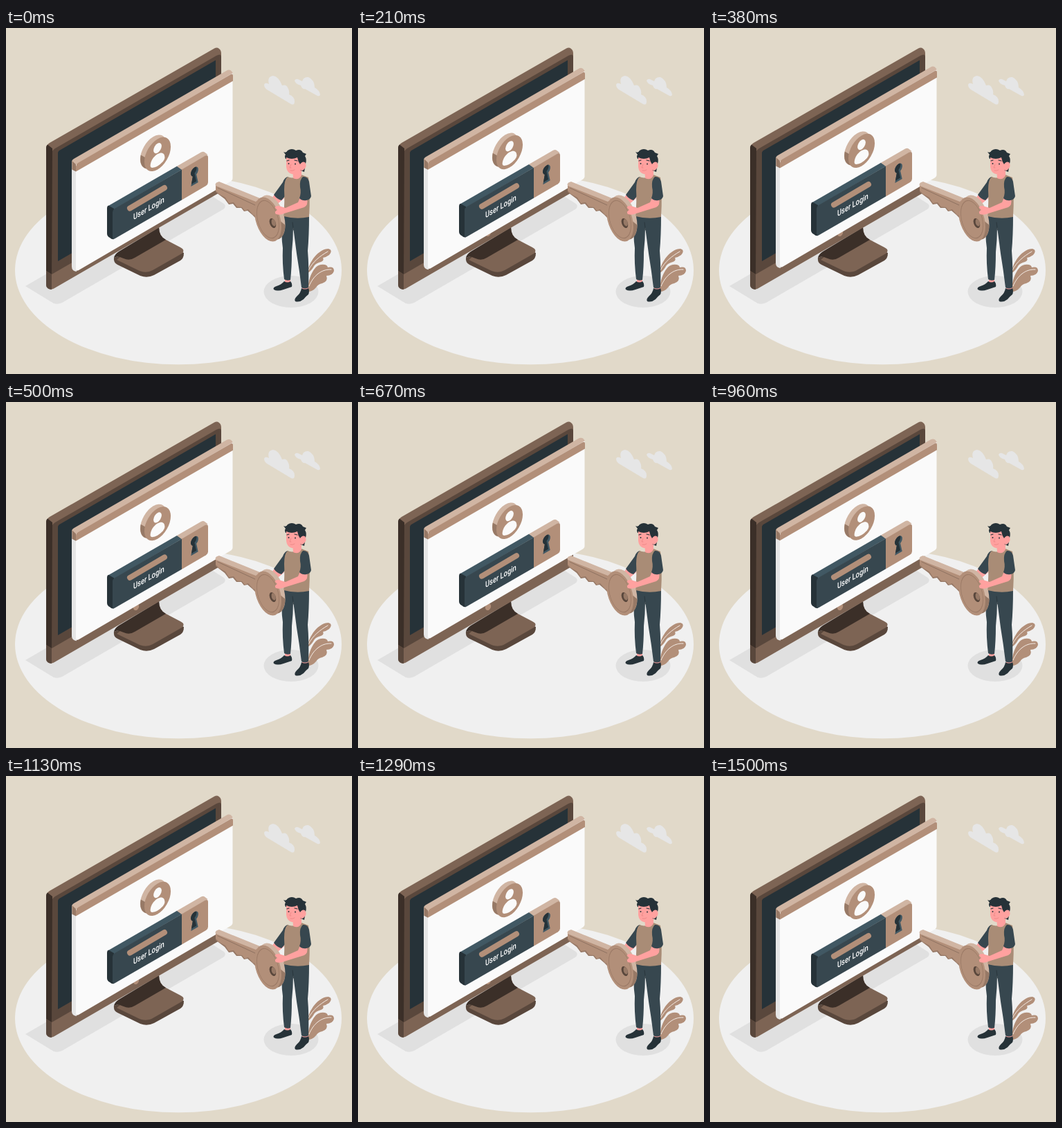
Recreate the animation shown at these times as an HTML page. Size 500 by 500 pixels, loop 1540 ms.

```html
<!DOCTYPE html>
<html lang="en">
<head>
<meta charset="utf-8">
<title>User Login</title>
<style>
  html, body { margin: 0; height: 100%; overflow: hidden; background: #e1d9c9; }
  svg { display: block; width: 100%; height: 100%; }
  .tan { fill: #b28f79; }
  .shirt { fill: #a98c76; }
  .light { fill: #d0b5a3; }
  .shade { fill: #977966; }
  .brown { fill: #7d6454; }
  .deep { fill: #59473c; }
  .dark { fill: #3b2f28; }
  .ink { fill: #263238; }
  .slate { fill: #37474f; }
  .steel { fill: #415863; }
  .grey { fill: #e0e0e0; }
  .white { fill: #fafafa; }
  .skin { fill: #ffa19f; }
  .line { fill: none; stroke-linecap: round; stroke-linejoin: round; }
</style>
</head>
<body>
<svg viewBox="0 0 500 500">
  <defs>
    <path id="keyhole" d="M-3 5A6.3 6.3 0 1 1 3 5L6 18H-6Z"/>
    <clipPath id="hole"><use href="#keyhole"/></clipPath>
  </defs>

  <g fill="#e6e6e6">
    <path d="M373 82Q374 78 380 81Q377 70 386 69Q394 70 399 83Q405 81 407 86Q410 91 409 96Q417 99 417 106Q417 112 412 110L377 89Q373 86 373 82Z"/>
    <path d="M417 76Q419 72 424 75L428 77Q430 70 437 71Q446 75 446 86Q453 90 454 96Q454 99 450 98L432 88Q428 89 426 83Q418 81 417 76Z"/>
  </g>

  <ellipse cx="249" cy="350" rx="236" ry="136.300" fill="#f0f0f0"/>
  <g class="grey">
    <path d="M28 373L66 351L296 242L315 254Q319 258 314 262L81 397Q75 400 69 398Z"/>
    <ellipse cx="412" cy="381" rx="39.500" ry="23"/>
  </g>

  <g id="monitor">
    <path class="deep" d="M156 332Q155 339 161 342L194 358Q204 362 214 357L252 336Q257 333 257 325L220 310Z"/>
    <path class="brown" d="M221 288Q221 301 231 306L252 317Q260 321 254 326L212 350Q203 355 193 351L160 335L190 310Z"/>
    <path class="dark" d="M156 332Q157 327 163 323L221 288Q221 301 231 306L186 332Q178 337 170 333L162 330Z"/>
    <path class="brown" d="M58 174Q58 169 63 166L301 29.500Q305 27.500 308 30Q311 32 311 37V236.500L70 376Q66 378.500 62 377Q58 375 58 371Z"/>
    <path class="deep" d="M66 182Q66 177 71 174L304 40Q311 36 311 42V215L66 356Z"/>
    <path class="dark" d="M58 173Q58 170 60 168.500L67 174L66 356L58 351Z"/>
    <path class="deep" d="M58 351L66 356V378Q58 377 58 371Z"/>
    <path class="ink" d="M75 181Q75 178 78 176.500L303 46.500V205L75 337Z"/>
    <ellipse cx="188" cy="296" rx="4" ry="5.200" transform="rotate(20 188 296)" class="tan"/>
  </g>

  <g id="panel">
    <path d="M95 192L102 196V352Q95 351 95 345Z" fill="#e6e6e6"/>
    <path class="white" d="M101 195L327.500 64V217Q327.500 220 324 222L105 350Q101 352 101 348Z"/>
    <path class="light" d="M95 194Q95 190.500 98 189L319 61.500Q322 59.700 325 61.500L328 65L102 197.500Z"/>
    <path class="tan" d="M101 200Q101 197 104 195L324 67.500Q328 65 328 69V76.500L101 207.500Z"/>
    <path class="shade" d="M95.300 192L101 197V207.500L95.300 204.500Z"/>

    <g transform="matrix(.866 -.5 0 1 213 179)">
      <circle r="22" class="light"/>
      <path class="shade" d="M-21 -6A22 22 0 0 0 12 18.400L19 25.300L-14 1Z"/>
    </g>
    <g transform="matrix(.866 -.5 0 1 219 182.400)">
      <circle r="22" class="tan"/>
      <g class="white">
        <circle cy="-8.800" r="6.800"/>
        <path d="M-12 11C-12 -4 12 -4 12 11Q12 13 9 15Q0 19 -9 15Q-12 13 -12 11Z"/>
      </g>
    </g>

    <path class="steel" d="M147 257.500L247 199.700L255 204L155 263Z"/>
    <path class="light" d="M247 199.700L282 179.500Q285 178 287 179.500L291.500 183L254 205Z"/>
    <path class="ink" d="M146 260Q146 257 148 256.500L156 261V305Q153 306 150 303Q146 301 146 297Z"/>
    <path class="slate" d="M154 266Q154 263 157 261L254 204.500V248.500L157 304.500Q154 306 154 302Z"/>
    <path class="tan" d="M254 204.500L288 184.500Q292 182.500 292 187V223Q292 226 289 228L254 248.500Z"/>
    <path class="line" d="M179 260.500L229 231" stroke="#b28f79" stroke-width="8"/>
    <text transform="matrix(.76 -.44 0 1 184 277.500)" font-family="Roboto, sans-serif" font-weight="500" font-size="12.300" fill="#fff">User Login</text>
    <g transform="matrix(.866 -.5 0 1 272.500 208)">
      <use href="#keyhole" class="steel"/>
      <g clip-path="url(#hole)"><use href="#keyhole" x="-3" y="-3" class="ink"/></g>
    </g>
  </g>

  <g id="plant" class="tan">
    <path d="M436 354C437 338 452 319 466 319Q473 321 467 328Q463 331 458 332Q461 337 452 339Q446 341 444 346Q440 352 436 354Z"/>
    <path d="M436 381C436 362 445 343 455 342Q464 341 465 346Q474 344 474 351Q472 358 463 358Q466 366 457 369Q451 370 448 375Q443 381 436 381Z"/>
    <path class="line" stroke="#f5ece6" stroke-width="1" d="M437 350C443 338 453 330 465 323M438 373C444 358 456 348 470 349"/>
  </g>

  <g id="legs">
    <path class="skin" d="M403 360H411V370H403ZM428 371H437V381H428Z"/>
    <path class="ink" d="M402 366Q407 369 411 366Q414 369 413 374Q407 376 401 378Q392 381 387 378Q385 375 391 373Q398 371 402 366Z"/>
    <path class="ink" d="M427 376Q432 379 437 376Q439 380 437 385Q433 388 430 392Q424 397 418 395Q416 392 420 388Q426 383 427 376Z"/>
    <path class="slate" d="M400 270H438Q438 300 436 322Q438 345 437 375Q432 378 427 375Q424 350 420 326L415 288Q415 305 413 324Q413 346 411 364Q406 366 402 363Q399 340 400 318Q397 300 400 270Z"/>
    <path class="line" stroke="#263238" stroke-width=".8" d="M415.500 292L414 281"/>
  </g>

  <g id="body">
    <path class="skin" d="M390 238L402 246L388 258L355 250Q351 246 358 247L381 250Z"/>
    <path class="slate" d="M408 215Q403 215 400 223L387 241Q391 247 398 249L408 238Z"/>
    <path class="shirt" d="M407 215Q415 219 427 212L437 216Q440 240 438 273Q420 277 401 272Q403 250 402 234Q402 219 407 215Z"/>
    <path class="skin" d="M414 200H427V213Q423 221 415 217Z"/>
  </g>

  <g id="key">
    <path class="shade" d="M303 228L361 254V275L356 270L349 264L344 265L340 260L333 260L328 254L322 255L316 247L308 241L303 237Z"/>
    <path class="tan" d="M303 226L364 250V273L357 270L350 262L345 264L341 259L334 258.500L329 252L322 253L317 245L308 240L303 235Z"/>
    <path class="light" d="M302.500 226Q303 223 308 222L367 246L361 251L303 228Z"/>
    <path class="line" stroke="#8e7261" stroke-width="1" d="M306 231L360 256"/>
    <g transform="matrix(.866 .5 0 1 384 273.500)">
      <ellipse rx="22.500" ry="30" class="light"/>
      <path class="shade" d="M22.500 0A22.500 30 0 0 1 0 30L-7 34L13 -2Z"/>
    </g>
    <g transform="matrix(.866 .5 0 1 378.500 276.500)">
      <ellipse rx="22.500" ry="30" class="tan"/>
      <ellipse rx="18.500" ry="25.500" class="line" stroke="#9b7a66" stroke-width="1"/>
      <ellipse cx="8" cy="1.500" rx="5.500" ry="6.500" class="deep"/>
      <ellipse cx="9.500" cy="0" rx="3.600" ry="4.800" class="shade"/>
    </g>
  </g>

  <g id="arm">
    <path class="skin" d="M425 245L435 247Q437 256 431 259L402 268Q396 271 390 269Q387 265 392 263L389 260Q388 257 394 257L404 260L422 252Z"/>
    <path class="slate" d="M429 215Q436 214 438 222L441 243Q440 248 434 249Q428 250 424 246Q427 238 425 230Q424 219 429 215Z"/>
  </g>

  <g id="head">
    <path class="ink" d="M404 189Q402 185 404 183L401 179Q405 181 407 177Q413 173 419 177Q426 174 429 180L434 182L432 185Q435 190 433 196L431 208L424 205L410 190Z"/>
    <path class="skin" d="M405 187Q413 191 421 187Q422 193 425 197Q428 192 432 194Q436 200 430 205Q427 207 426 205Q423 213 413 211Q406 209 405 201Z"/>
    <path class="line" stroke="#263238" stroke-width="1.200" d="M406 192L409 191M417 191L421 192"/>
    <g class="ink"><circle cx="408.500" cy="196" r="1"/><circle cx="418" cy="196.500" r="1"/></g>
    <path class="line" stroke="#e98583" stroke-width=".8" d="M412 197L410 202H412M411 206Q414 207 417 205"/>
  </g>
</svg>
<script>
  const LOOP = 1540, FLOAT = 1500, RISE = 10, FPS = 24;
  const panel = document.getElementById('panel');

  function draw(now) {
    const step = Math.floor((now % LOOP + 4) * FPS / 1000);
    const t = step * 1000 / FPS % FLOAT;
    const y = RISE * (1 - Math.abs(t / (FLOAT / 2) - 1));
    panel.setAttribute('transform', `translate(0 ${-y})`);
    requestAnimationFrame(draw);
  }
  draw(performance.now());
</script>
</body>
</html>
```
